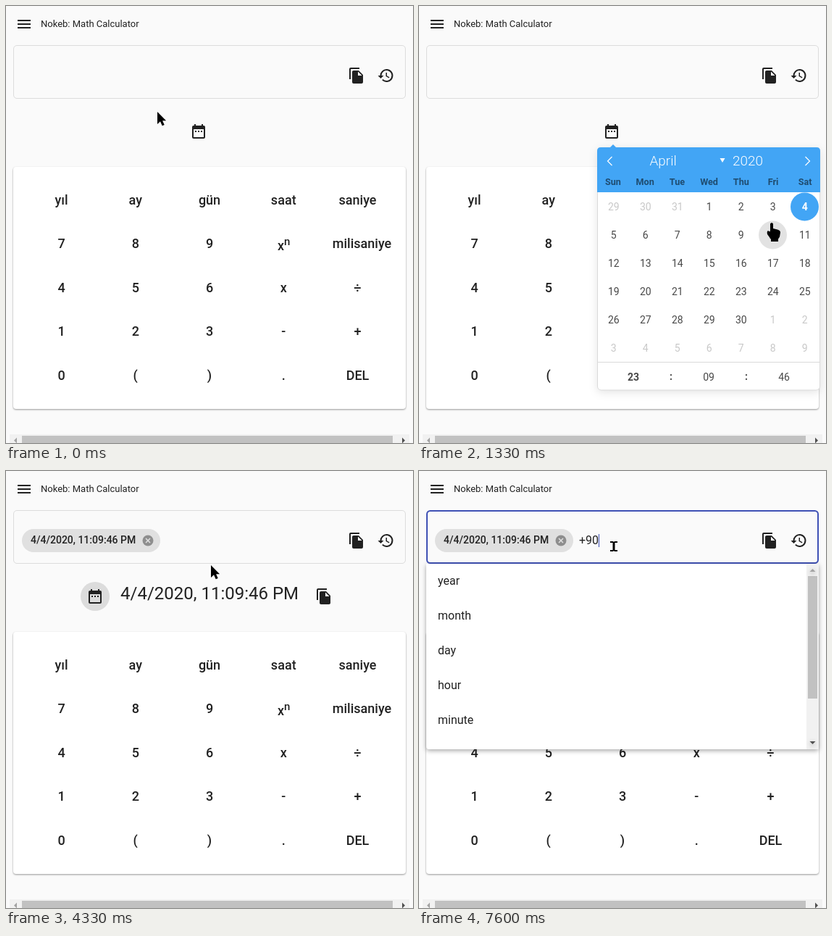
Recreate the animation shown at these times as an HTML page. Size 562x603 px, loop 8 s.

```html
<!DOCTYPE html>
<html lang="en">
<head>
<meta charset="utf-8">
<title>Math Calculator</title>
<style>
html, body { margin: 0; width: 100%; height: 100%; overflow: hidden; background: #fafafa; }
svg { display: block; font-family: Roboto, sans-serif; }
#card { filter: drop-shadow(0 1px 1px rgba(0,0,0,.3)) drop-shadow(0 1px 1px rgba(0,0,0,.1)); }
#popup { filter: drop-shadow(0 3px 6px rgba(0,0,0,.1)); }
#list > path { filter: drop-shadow(0 2px 3px rgba(0,0,0,.35)); }
</style>
</head>
<body>
<svg id="stage" width="562" height="603" viewBox="0 0 562 603"></svg>
<script>
const INK = '#212121', BLUE = '#42a5f5', INDIGO = '#3f51b5';
const LOOP = 8000, STEP = 1000 / 15;
const STAMP = '4/4/2020, 11:09:46 PM';
const ICONS = {
  menu: 'M3 18h18v-2H3zm0-5h18v-2H3zm0-7v2h18V6z',
  copy: 'M16 1H4c-1.1 0-2 .9-2 2v14h2V3h12zm-1 4l6 6v10c0 1.1-.9 2-2 2H8c-1.1 0-2-.9-2-2V7c0-1.1.9-2 2-2zm-1 7h5.5L14 6.5z',
  history: 'M13 3a9 9 0 0 0-9 9H1l4 4 4-4H6a7 7 0 1 1 2.06 4.94l-1.42 1.42A9 9 0 1 0 13 3zm-1 5v5l4.28 2.54.72-1.21-3.5-2.08V8z',
  calendar: 'M9 11H7v2h2zm4 0h-2v2h2zm4 0h-2v2h2zm2-7h-1V2h-2v2H8V2H6v2H5c-1.1 0-2 .9-2 2v14c0 1.1.9 2 2 2h14c1.1 0 2-.9 2-2V6c0-1.1-.9-2-2-2zm0 16H5V9h14z'
};

const text = (x, y, s, size, weight = 400, fill = INK, anchor = 'start') =>
  `<text x="${x}" y="${y}" font-size="${size}" font-weight="${weight}" fill="${fill}" text-anchor="${anchor}">${s}</text>`;
const mid = (x, y, s, size, weight, fill) => text(x, y, s, size, weight, fill, 'middle');
const rect = (x, y, w, h, fill, r = 0, extra = '') =>
  `<rect x="${x}" y="${y}" width="${w}" height="${h}" rx="${r}" fill="${fill}" ${extra}/>`;
const circle = (x, y, r, fill, id = '') => `<circle id="${id}" cx="${x}" cy="${y}" r="${r}" fill="${fill}"/>`;
const path = (d, fill, extra = '') => `<path d="${d}" fill="${fill}" ${extra}/>`;
const icon = (name, x, y) => path(ICONS[name], INK, `transform="translate(${x} ${y})"`);
const group = (id, body) => `<g id="${id}">${body}</g>`;

function keypad() {
  const rows = ['yıl ay gün saat saniye', '7 8 9 ^ milisaniye', '4 5 6 x ÷', '1 2 3 - +', '0 ( ) . DEL'];
  let out = '';
  rows.forEach((row, r) => row.split(' ').forEach((key, c) => {
    const x = 76.5 + c * 102.25, y = 274 + Math.round(r * 60.4);
    if (key === '^') out += text(375, 337, 'x', 18, 500) + text(384, 330, 'n', 15, 500);
    else out += mid(key === 'milisaniye' ? 491.5 : x, y, key, 18, 500);
  }));
  return out;
}

function picker() {
  let out = path('M263 196l5-5 5 5z', BLUE) + rect(246.5, 195.5, 307, 334.5, '#fff', 5, 'stroke="#dadada"')
    + path('M246 257v-57q0-5 5-5h298q5 0 5 5v57z', BLUE)
    + path('M266.500 208l-6 6 6 6M533.500 208l6 6-6 6', 'none', 'stroke="#fff" stroke-width="1.2"')
    + text(318.5, 220, 'April', 18.9, 300, '#fff') + text(433, 220, '2020', 18.9, 300, '#fff')
    + path('M415.500 210h7l-3.500 6z', '#fff');
  'Sun Mon Tue Wed Thu Fri Sat'.split(' ').forEach((d, i) =>
    out += mid(268 + i * 44.2, 247, d, 12.6, 700, 'rgba(0,0,0,.54)'));
  out += circle(532.5, 277, 19.5, BLUE) + circle(0, 0, 19.5, '#e2e2e2', 'hover');
  for (let i = 0; i < 42; i++) {
    const day = i < 3 ? 29 + i : (i - 3) % 30 + 1;
    const inMonth = i > 2 && i < 33, chosen = i === 6;
    out += mid(268.8 + i % 7 * 44, 282 + Math.floor(i / 7) * 39, day, 14, chosen ? 700 : 400,
      chosen ? '#fff' : inMonth ? '#484848' : '#c8c8c8');
  }
  return out + rect(247, 491, 307, 1, '#dadada') + rect(247, 492, 98, 38, '#eee', 0, 'id="hour"')
    + mid(296, 517, '23', 14, 700, '#484848') + mid(400, 517, '09', 14, 400, '#484848')
    + mid(504, 517, '46', 14, 400, '#484848') + mid(348, 516, ':', 14, 700, '#484848')
    + mid(452, 516, ':', 14, 700, '#484848');
}

function suggestions() {
  let out = path('M10 128h542v252q0 4-4 4H14q-4 0-4-4z', '#fff');
  ['year', 'month', 'day', 'hour', 'minute'].forEach((s, i) => out += text(26, 157 + i * 48, s, 16));
  return out + rect(535, 128, 17, 256, '#f1f1f1') + rect(537, 145, 13, 169, '#c1c1c1')
    + path('M539.500 139h8l-4-4z', '#a3a3a3') + path('M539.500 373h8l-4 4z', '#505050');
}

const $ = id => document.getElementById(id);
$('stage').innerHTML =
  rect(0, 0, 562, 603, '#fafafa') + icon('menu', 13, 13) + text(48, 29, 'Nokeb: Math Calculator', 13)
  + rect(10.5, 54.5, 541, 73, 'none', 4.5, 'id="field"')
  + icon('copy', 472, 84) + icon('history', 512.5, 84)
  + rect(10, 222, 542, 334, '#fff', 4, 'id="card"') + keypad()
  + group('before', circle(266, 173, 19.5, '#000', 'halo') + circle(266, 173, 0, '#000', 'ripple') + icon('calendar', 254, 161))
  + group('result',
      rect(22, 80, 191, 32, '#e0e0e0', 16) + text(34, 100, STAMP, 14, 500)
      + circle(196, 96, 7.5, '#8e8e8e') + path('M193 93l6 6m0-6l-6 6', 'none', 'stroke="#e0e0e0" stroke-width="1.6"')
      + circle(123, 173, 20, '#dcdcdc', 'focus') + icon('calendar', 111, 161)
      + circle(158, 168, 9, '#e0e0e0', 'spot') + text(158, 177, STAMP, 24) + icon('copy', 427, 161))
  + rect(5, 591, 552, 12, '#f1f1f1') + rect(22, 593, 512, 10, '#c1c1c1')
  + path('M15 595.500v8l-4-4z', '#a3a3a3') + path('M547 595.500v8l4-4z', '#505050')
  + group('list', suggestions())
  + '<text id="typed" x="221" y="101" font-size="16" fill="#212121"></text>'
  + rect(221, 87, 1, 18, INDIGO, 0, 'id="caret"')
  + group('popup', picker())
  + group('arrow', path('M0 0v17l4-3.800 2.700 6 3-1.300-2.600-5.700h5z', '#000'))
  + group('hand', path('M-2 1.500q2-3 4 0v6.500l6 1.500q4 1 4 4l-1 6-2 3v3.500h-10v-3l-5-7q-1-4 1-5l3 2z', '#000'))
  + group('beam', path('M-5-7h4l1 1 1-1h4v2H1.500V5H5v2H1l-1-1-1 1h-4V5h3.500V-5H-5z', '#000'));

// Pointer positions: time, x, y
const TRACK = [[0, 209, 146], [70, 216, 149], [330, 262, 165], [730, 262, 165], [1330, 487, 299],
  [1400, 487, 299], [1670, 541, 282], [3870, 541, 282], [4330, 283, 130], [4600, 269, 104], [LOOP, 269, 104]];

function pointer(t) {
  const i = TRACK.findIndex(k => k[0] > t);
  const a = TRACK[i - 1], b = TRACK[i], p = (t - a[0]) / (b[0] - a[0]);
  return [a[1] + (b[1] - a[1]) * p, a[2] + (b[2] - a[2]) * p].map(Math.round);
}

const show = (id, on) => $(id).setAttribute('display', on ? 'inline' : 'none');
const set = (id, attrs) => { for (const k in attrs) $(id).setAttribute(k, attrs[k]); };
const within = (t, a, b) => t >= a && t < b;

function draw(t) {
  const [x, y] = pointer(t);
  const open = within(t, 600, 3200), focused = t >= 4670;

  const kind = within(t, 330, 3200) ? 'hand' : t > 3900 && y < 128 ? 'beam' : 'arrow';
  ['arrow', 'hand', 'beam'].forEach(id => show(id, id === kind));
  set(kind, { transform: `translate(${x} ${y})` });

  show('before', t < 3200);
  const fade = within(t, 600, 1070) ? 1 - (t - 600) / 470 : 0;
  set('halo', { opacity: 0.07 * fade });
  set('ripple', { r: Math.min(19.5, 8 + (t - 600) / 12), opacity: 0.1 * fade });

  show('popup', open);
  const rest = Math.max(0, 1 - (t - 550) / 300) ** 4;
  set('popup', { opacity: 1 - Math.min(1, rest), transform: `translate(0 ${-20 * rest})` });
  const col = Math.floor((x - 247) / 44), row = Math.floor((y - 257.5) / 39);
  show('hover', open && col >= 0 && row >= 0 && !(col === 6 && row === 0));
  set('hover', { cx: 268.5 + col * 44, cy: 277 + row * 39 });
  show('hour', t >= 2070);

  show('result', t >= 3200);
  set('focus', { opacity: t < 3270 ? 0.1 : 1 });
  show('spot', t < 3270);

  set('field', focused
    ? { x: 11, y: 55, width: 540, height: 72, stroke: INDIGO, 'stroke-width': 2 }
    : { x: 10.5, y: 54.5, width: 541, height: 73, stroke: '#dcdcdc', 'stroke-width': 1 });
  show('list', focused);
  const count = t >= 7600 ? 3 : t >= 7470 ? 2 : t >= 6400 ? 1 : 0;
  $('typed').textContent = '+90'.slice(0, count);
  set('caret', { x: Math.round(221 + count * 9.05) });
  show('caret', within(t, 4670, 5200) || within(t, 5730, 6200) || within(t, 6400, 6930) || t >= 7470);
}

function tick() {
  const frame = Math.floor((performance.now() % LOOP + 5) / STEP);
  draw(Math.min(LOOP - 10, Math.round(frame * STEP / 10) * 10));
  requestAnimationFrame(tick);
}
tick();
</script>
</body>
</html>
```
